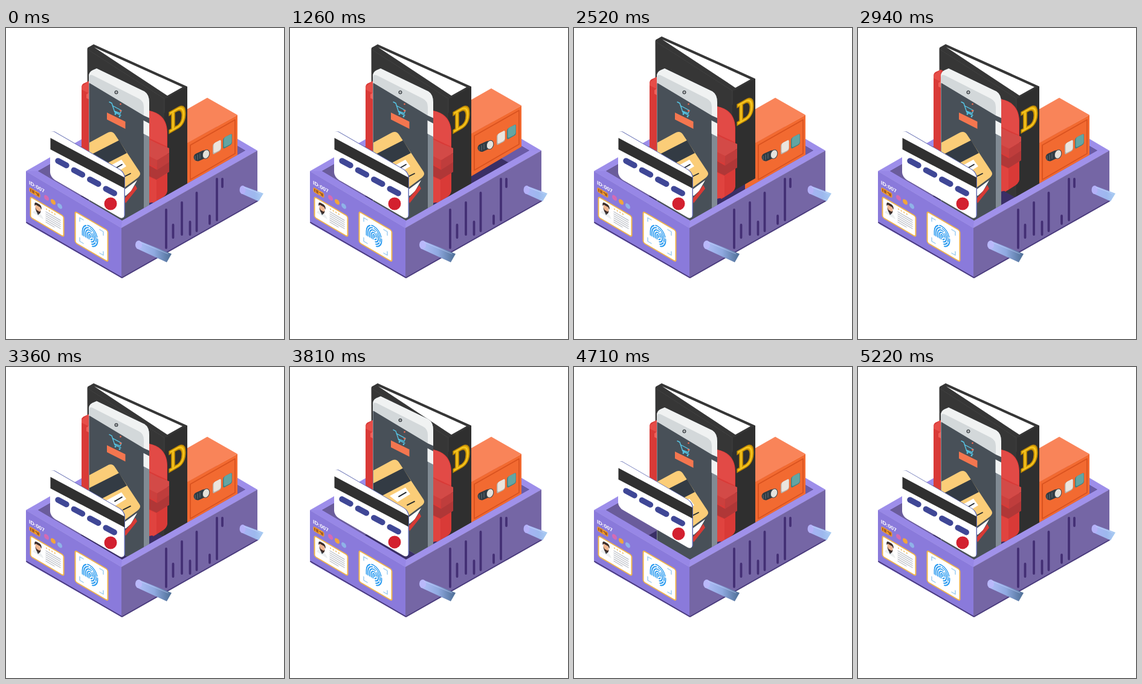
An HTML page for the animation above (6000 ms loop, 460 px wide and 515 px high).

```html
<!DOCTYPE html>
<html lang="en">
<head>
<meta charset="utf-8">
<title>Secure tray</title>
<style>
html, body { margin: 0; width: 100%; height: 100%; overflow: hidden; background: #fff; }
svg { display: block; width: 460px; height: 515px; }
text { font-family: "Liberation Sans", Arial, sans-serif; font-weight: 700; }
.line { fill: none; stroke-linecap: round; stroke-linejoin: round; }
</style>
</head>
<body>
<svg viewBox="0 0 460 515">
  <defs>
    <clipPath id="inside"><path d="M0 0H460V166L396 203 192 319 53 237 0 206Z"/></clipPath>
    <clipPath id="screen"><path d="M138 60L228 60V340L138 288Z"/></clipPath>
    <linearGradient id="pin">
      <stop offset="0" stop-color="#b3c0fa"/><stop offset=".5" stop-color="#8fa9e0"/><stop offset="1" stop-color="#4c6d94"/>
    </linearGradient>
    <linearGradient id="pinFar">
      <stop offset="0" stop-color="#a9b2f6"/><stop offset=".6" stop-color="#9db8ee"/><stop offset="1" stop-color="#a9cdf2"/>
    </linearGradient>
  </defs>

  <!-- tray interior -->
  <path fill="#9d8eea" d="M33 237L256 109 416 203 191 331Z"/>
  <path fill="#3a2f66" d="M53 237L256 121 396 203 192 319Z"/>
  <path fill="#6a5c9b" d="M53 237L256 121V204L142 268 123 279Z"/>
  <path fill="#6a5ba6" d="M256 121L396 203 362 223 256 164Z"/>

  <g clip-path="url(#inside)">
    <!-- safe -->
    <g class="item">
      <path fill="#f98459" d="M283 144L333 115.500 383 144 300 191Z"/>
      <path fill="#f26a31" d="M283 200L383 144V212L283 271Z"/>
      <path class="line" stroke="#d9521f" stroke-width="1.800" d="M305 194L379 152V208L305 251Z"/>
      <path class="line" stroke="#2f3a42" stroke-width="13" d="M317 214L328 209"/>
      <path class="line" stroke="#66737a" stroke-width="1" d="M313 212V219M317 210V218M321 208V216"/>
      <ellipse cx="331" cy="209" rx="5.500" ry="7.500" fill="#e4e2dc" stroke="#3c474d" transform="rotate(20 331 209)"/>
      <g transform="translate(342 192) skewY(-28)">
        <rect width="14" height="18" rx="3" fill="#b9aca3"/><rect x="1.500" width="12" height="16.500" rx="3" fill="#ebe5de"/>
      </g>
      <g transform="translate(359 182.500) skewY(-28)">
        <rect width="15" height="18" rx="3" fill="#3f7f80"/><rect x="1.500" width="13" height="16.500" rx="3" fill="#63a5a3"/>
      </g>
    </g>

    <!-- book -->
    <g class="item">
      <path fill="#363636" d="M134.500 35Q134.500 32 138 31L145 27 300 97V259L262 282 135 210Z"/>
      <path fill="#fff" d="M146 32L292 98 267 112Z"/>
      <path fill="#2f2f2f" d="M262 118L300 97V262L262 284Z"/>
      <path class="line" stroke="#404040" d="M136 36L262 117V140"/>
      <g transform="matrix(.96 -.54 0 1 270 139.500)">
        <path fill="#e9b10b" stroke="#b98505" stroke-width="1.500" fill-rule="evenodd"
          d="M0 0H16Q28 1 28 17Q28 34 16 35H0V29.500H4V5.500H0ZM9.500 5.500V29.500H15Q22 28 22 17Q22 7 15 5.500Z"/>
        <path class="line" stroke="#ffd83a" stroke-width="1" d="M2 2.500H16Q25 5 25 17Q25 31 16 32.500H2M6.500 4V31"/>
      </g>
    </g>

    <!-- wallet -->
    <g class="item">
      <path fill="#d93a37" d="M125 97Q125 94 128 92L137 88 238 137Q266 143 267 172V270Q266 276 260 280L244 290 125 222Z"/>
      <path fill="#e64d48" d="M125 97L137 88V108L125 102Z"/>
      <path fill="#f06059" d="M133 110L137 107V118L133 116Z"/>
      <path fill="#e24a46" d="M236 137Q264 143 266 170V196L236 182Z"/>
      <path fill="#e0433f" d="M236 246L249 252V287L236 290Z"/>
      <path fill="#d34a47" d="M236 184L252 192 270 199V207L250 219 236 212Z"/>
      <path fill="#bf3d3c" d="M250 219L270 207V238L249 251Z"/>
      <path fill="#cb403e" d="M236 212L250 219 249 231 236 226Z"/>
      <path fill="#b03737" d="M236 227L250 235 270 222V238L249 251 236 245Z"/>
    </g>

    <!-- phone -->
    <g class="item">
      <path fill="#818b94" d="M137 80Q137 73 143 70L150 67 229 105Q237 110 237 123V336L228 340 137 288Z"/>
      <path fill="#f0f2f2" d="M137 80Q137 73 143 70L150 67 229 105Q237 110 237 123V150L228 146 137 91Z"/>
      <path fill="#d3d8da" d="M137 91V83Q137 75 145 79L220 117Q228 121 228 131V146Z"/>
      <path fill="#485058" d="M138 91L228 145 237 149V160L228 155V340L138 288Z"/>
      <path fill="#f1f3f3" d="M227.500 153L237 158V180L227.500 175Z"/>
      <circle cx="182.500" cy="106.500" r="2.300" fill="#fff" stroke="#2d3338" stroke-width="1.300"/>
      <circle cx="182.500" cy="106.500" r=".8" fill="#2d3338"/>
      <g transform="translate(1 -.5)">
        <path class="line" stroke="#55c6e6" stroke-width="1.400" d="M170 123L174 125 179 140 189 145M175 129L190 137 188 142 178 138"/>
        <circle cx="188.500" cy="126.500" r="1.300" fill="#f06b4f"/>
        <circle cx="188.500" cy="137.500" r="1.600" fill="#f06b4f"/>
        <circle cx="180" cy="143" r="1.400" fill="#55c6e6"/><circle cx="187" cy="147" r="1.400" fill="#55c6e6"/>
      </g>
      <path fill="#f4764f" d="M167 140L197.500 155V167L167 151.500Z"/>
      <g clip-path="url(#screen)">
        <path fill="#fff" d="M190 272L217 252 207 270 198 278Z"/>
        <path fill="#d83a35" d="M195 284L206 271 214 260 217 266 198 290Z"/>
        <path fill="#fbcd78" d="M130 194L167 174Q175 169 180 176L221 238Q224 243 218 248L195 265 130 250Z"/>
        <path fill="#333b44" d="M130 215L187 186 200 207 140 238Z"/>
        <path fill="#fff" d="M165 232L191 218 199 229 178 242Z"/>
        <path class="line" stroke="#22272c" stroke-width="1.800" d="M180 233L192 226M194 247L206 241"/>
      </g>
    </g>

    <!-- bank card -->
    <g class="item">
      <g transform="matrix(1 .58 0 1 73 168)">
        <rect x="1" y="-1" width="123" height="78.500" rx="8" fill="#6670b4"/>
        <rect width="122.500" height="79" rx="8" fill="#fff"/>
      </g>
      <path fill="#303030" d="M73.500 182L196 247.500V265.500L73.500 201Z"/>
      <g id="pills" class="line" stroke="#3f4796" stroke-width="9.500"></g>
      <circle cx="173" cy="291" r="10.500" fill="#d3202f"/>
    </g>
  </g>

  <!-- front rim and walls -->
  <path fill="#9787e6" d="M33 237L53 237 192 319 191 331Z"/>
  <path fill="#a091ea" d="M192 319L396 203H416L191 331Z"/>
  <path fill="#8a7adb" d="M33 237L191 331V414L36 325Q33 323 33 319Z"/>
  <path fill="#7566a5" d="M191 331L416 203V287L191 414Z"/>
  <path class="line" stroke="#493a7c" stroke-width="2" d="M34 322L192 413.500 416 286.500"/>
  <g id="slots" class="line" stroke="#432f74" stroke-width="3.800"></g>

  <!-- left panel -->
  <g transform="matrix(1 .5875 0 1 33 237)">
    <text x="5" y="18.500" font-size="8.600" fill="#fff">ID:007</text>
    <rect x="5.500" y="23" width="18" height="8" rx="2.500" fill="#f09a2c"/>
    <path class="line" stroke="#7d3f22" stroke-width="1.300" d="M8 25V29M11 25V29M13 25V29M16 26H19V29M21 25V29"/>
    <circle cx="34" cy="24.300" r="4" fill="#d56bb4"/>
    <circle cx="45" cy="24.600" r="4" fill="#f1a53b"/>
    <circle cx="56" cy="25" r="4" fill="#8fb3e8"/>

    <rect x="7.500" y="38" width="55" height="34" rx="3" fill="#fff" stroke="#f0b54c" stroke-width="2"/>
    <path fill="#eceff0" d="M11 62Q13 56 20 56Q27 56 29 63Z"/>
    <path fill="#35414b" d="M18 58L20 61 22 58Z"/>
    <ellipse cx="20" cy="50" rx="4.500" ry="5.500" fill="#efb690"/>
    <path fill="#3b2c29" d="M14.500 49Q13 41 20 42Q27 41 25.500 49L23.500 46H16.500ZM15.500 51Q16 58 20 58.500Q24 58 24.500 51L22.500 54H17.500Z"/>
    <path class="line" stroke="#f2bd62" stroke-width="2.200" stroke-dasharray=".1 4.500" d="M34 43H49"/>
    <g id="lines" class="line" stroke="#b8bcc4" stroke-width="1.300"></g>

    <rect x="81.500" y="19" width="54" height="51.500" rx="3" fill="#fff" stroke="#f0b54c" stroke-width="2"/>
    <path class="line" stroke="#9fcdf0" stroke-width="1.500" d="M89 31V25H95M122 25H128V31M128 58V64H122M95 64H89V58"/>
    <g id="print" class="line" stroke="#2d9cf0" stroke-width="1.700" stroke-dasharray="21 3"></g>
  </g>

  <!-- pins -->
  <path fill="url(#pin)" d="M219 352L274 374 266 388 216 365Z"/>
  <ellipse cx="219.500" cy="359" rx="5.500" ry="7" fill="#b9b8fa"/>
  <path class="line" stroke="#c8d4ff" opacity=".6" d="M222 355L268 374"/>
  <path fill="url(#pinFar)" d="M391 261L426 274 418 287 389 274Z"/>
  <ellipse cx="391.500" cy="268" rx="5" ry="7" fill="#b4b0f8"/>
  <path class="line" stroke="#d0dcff" opacity=".6" d="M394 264L421 274"/>
</svg>
<script>
const LOOP = 6000, TICK = 30, START = 700, STAGGER = 747, SPAN = 1560, LIFT = 19;
const fill = (id, paths) => {
  document.getElementById(id).innerHTML = paths.map(d => `<path d="${d}"/>`).join("");
};

fill("pills", [0, 1, 2, 3].map(i => `M${86 + 26.4 * i} ${220 + 15.4 * i}l14 7.500`));
fill("slots", [
  [265, 301, 364], [276.500, 326, 347], [291, 289, 342], [304.500, 321, 342],
  [315.500, 273, 336], [337, 311, 324], [349, 250, 318], [358, 250, 263]
].map(([x, top, end]) => `M${x} ${top}V${end}`));
fill("lines", [0, 1, 2, 3, 4, 5].map(i => `M33 ${48 + 3.4 * i}H${i === 5 ? 47 : 57}`));
fill("print", [1.6, 4.4, 7.2, 10, 12.6].map(r =>
  `M${106 - r} 51V45A${r} ${r * 1.25} 0 0 1 ${106 + r} 45A${r} ${r * 1.25} 0 0 1 ${106 + r * 0.3} ${45 + r * 1.2}`));

const items = [...document.querySelectorAll(".item")];

function draw(now) {
  const t = Math.floor((now % LOOP) / TICK) * TICK;
  items.forEach((item, i) => {
    const p = (t - START - i * STAGGER) / SPAN;
    const y = p > 0 && p < 1 ? LIFT * Math.sin(Math.PI * p) ** 2 : 0;
    item.setAttribute("transform", `translate(0 ${-y.toFixed(2)})`);
  });
}

const begin = performance.now();
function frame() {
  draw(performance.now() - begin);
  requestAnimationFrame(frame);
}
frame();
</script>
</body>
</html>
```
